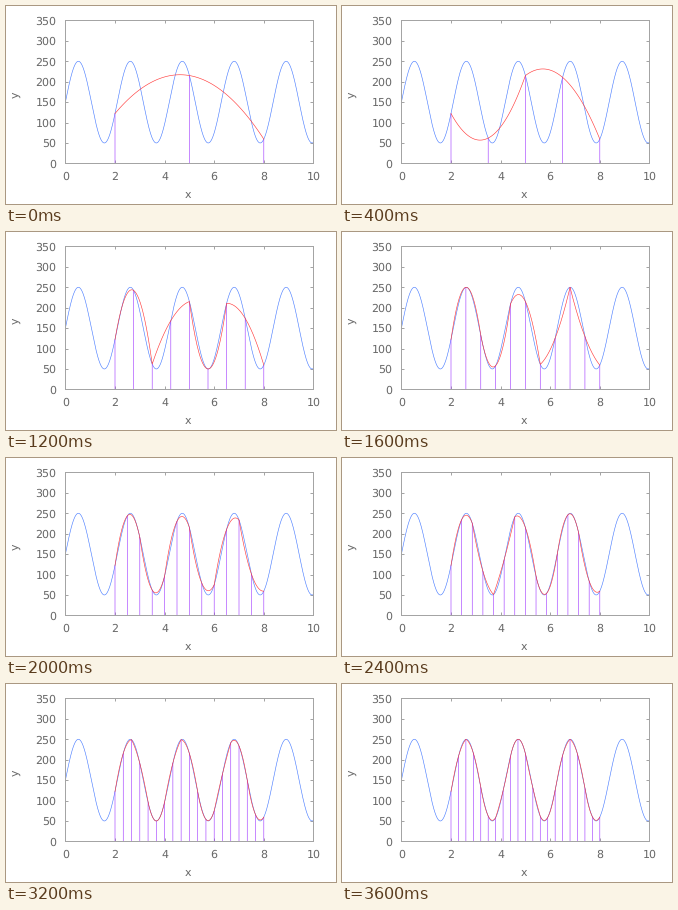
Animation of 330 by 198 pixels, one loop 4000 ms. Source, as a matplotlib script:

```python
import numpy as np
import matplotlib.pyplot as plt
from matplotlib.animation import FuncAnimation

W, H, DPI = 330, 198, 100
PX = 72 / DPI  # one pixel in points
LEFT, RIGHT, TOP, BOTTOM = 59.4, 307.4, 14.4, 157.4
A, B = 2, 8  # integration limits
STEPS = 10
THIN = 0.6 * PX
INK, FRAME = "#686868", "#a4a4a4"
BLUE, RED, PURPLE = "#4a7dff", "#ff3838", "#a23cff"

plt.rcParams.update({"font.family": "DejaVu Sans", "font.size": 11.4 * PX,
                     "text.hinting": "none", "text.hinting_factor": 1})


def f(x):
    return 150 + 100 * np.sin(3 * x)


def simpson_curve(nodes):
    """Piecewise parabolas through each consecutive triple of nodes."""
    xs, ys = [], []
    h = nodes[1] - nodes[0]
    t = np.linspace(-1, 1, 60)
    for mid in nodes[1::2]:
        y0, y1, y2 = f(np.array([mid - h, mid, mid + h]))
        xs.append(mid + h * t)
        ys.append(y1 + (y2 - y0) / 2 * t + (y0 - 2 * y1 + y2) / 2 * t**2)
    return np.concatenate(xs), np.concatenate(ys)


fig = plt.figure(figsize=(W / DPI, H / DPI), dpi=DPI, facecolor="white")
ax = fig.add_axes([LEFT / W, 1 - BOTTOM / H,
                   (RIGHT - LEFT) / W, (BOTTOM - TOP) / H])
ax.set(xlim=(0, 10), ylim=(0, 350),
       xticks=range(0, 11, 2), yticks=range(0, 351, 50))
ax.tick_params(direction="in", top=True, right=True, length=3 * PX,
               width=PX, color=FRAME, labelcolor=INK)
ax.tick_params(axis="x", pad=8 * PX)
ax.tick_params(axis="y", pad=9 * PX)
for spine in ax.spines.values():
    spine.set(color=FRAME, linewidth=PX)

fig.text(182.3 / W, 1 - 192 / H, "x", color=INK, ha="center", va="baseline")
fig.text(12.5 / W, 1 - 88.5 / H, "y", color=INK, rotation=90,
         rotation_mode="anchor", ha="center", va="baseline")

x = np.linspace(0, 10, 800)
ax.plot(x, f(x), color=BLUE, lw=THIN, zorder=2)
bars = ax.vlines([], [], [], color=PURPLE, lw=THIN, zorder=3)
bars.set_snap(False)
fit, = ax.plot([], [], color=RED, lw=THIN, zorder=4)


def update(i):
    nodes = np.linspace(A, B, 2 * (i + 1) + 1)
    bars.set_segments([[(n, 0), (n, f(n))] for n in nodes])
    fit.set_data(*simpson_curve(nodes))
    return bars, fit


anim = FuncAnimation(fig, update, frames=STEPS, interval=400,
                     repeat=True, repeat_delay=0)
plt.show()
```
